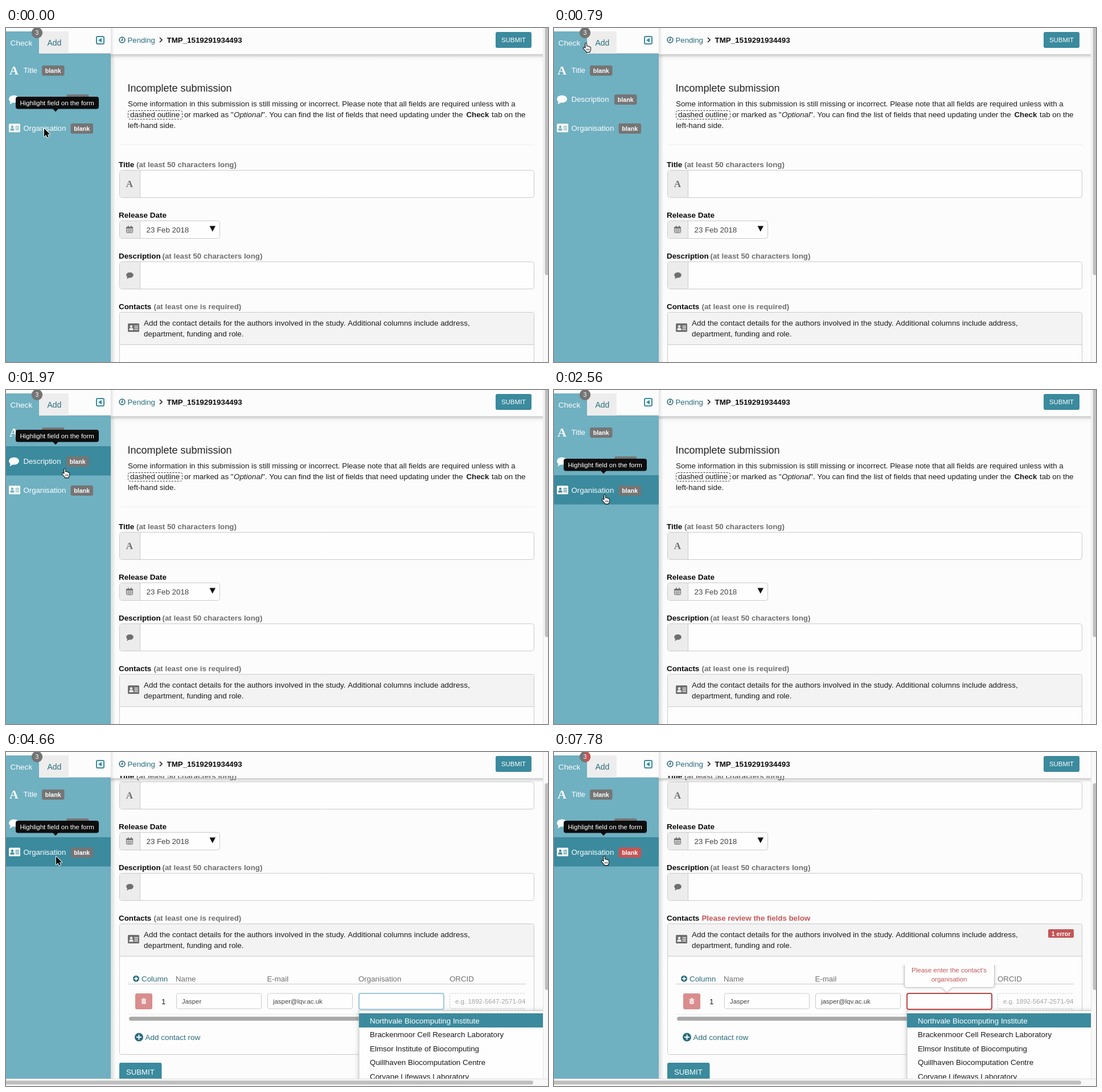
An HTML page with a canvas that plays this animation: 952 by 588 pixels, repeating every 8000 ms.

```html
<!DOCTYPE html>
<html lang="en">
<head>
<meta charset="utf-8">
<title>Submission form</title>
<style>
html, body { margin: 0; width: 100%; height: 100%; overflow: hidden; background: #fcfcfc; }
canvas { display: block; }
</style>
</head>
<body>
<canvas id="stage" width="952" height="588"></canvas>
<script>
const c = document.getElementById('stage').getContext('2d');
const LOOP = 8000, SCROLL = 198, SCROLL_AT = 4660, ERROR_AT = 6300;
const SANS = '"Liberation Sans", Arial, sans-serif';
const SERIF = '"Liberation Serif", serif';
const TEAL = '#3b8a9d', DEEP = '#2a6c7d', SIDE = '#6fb0c1', RED = '#c45556';
const GREY = '#6f6f6f', LINE = '#cacaca', INK = '#1c1c1c';

// start, cursor, x, y, hovered row, tooltip row
const STEPS = [
  [0, 'arrow', 67, 177, -1, 2],
  [500, 'hand', 64, 153, 2, 2],
  [640, 'hand', 61, 114, 1, 1],
  [790, 'hand', 51, 26, -1, -1],
  [930, 'arrow', 59, -13, -1, -1],
  [1080, '', 0, 0, -1, -1],
  [1680, 'arrow', 79, 1, -1, -1],
  [1820, 'hand', 96, 93, 0, 0],
  [1970, 'hand', 98, 138, 1, 1],
  [2110, 'hand', 98, 155, 2, 2],
  [2260, 'hand', 94, 173, 2, 2],
  [2410, 'hand', 90, 180, 2, 2],
  [2560, 'hand', 84, 184, 2, 2],
  [4510, 'arrow', 88, 184, 2, 2],
  [4810, 'hand', 83, 183, 2, 2],
  [6150, 'beam', 88, 184, 2, 2],
  [6300, 'hand', 83, 183, 2, 2]
];
const CARET_ON = [[4810, 5110], [5560, 6150], [6300, 6740], [7340, 7780]];
const FIELD_EDGE = [[4660, '#9cc8d4'], [4810, '#38b2ce'], [6300, '#8c7a84'], [6440, '#bb4543']];
const at = (list, t) => list.filter(s => s[0] <= t).pop();

function text(str, x, y, size = 13.4, color = INK, style = '', align = 'left', family = SANS) {
  c.font = `${style} ${size}px ${family}`;
  c.fillStyle = color;
  c.textAlign = align;
  c.fillText(str, x, y);
}
const bold = (str, x, y, size, color) => text(str, x, y, size, color, 'bold');

function rect(x, y, w, h, color) {
  c.fillStyle = color;
  c.fillRect(x, y, w, h);
}

function box(x, y, w, h, r, fill, edge, width = 1) {
  c.beginPath();
  c.roundRect(x, y, w, h, r);
  if (fill) { c.fillStyle = fill; c.fill(); }
  if (edge) { c.strokeStyle = edge; c.lineWidth = width; c.stroke(); }
}

function shape(points, color) {
  c.beginPath();
  points.forEach(([x, y]) => c.lineTo(x, y));
  c.closePath();
  c.fillStyle = color;
  c.fill();
}

function disc(x, y, r, color, from = 0, to = 2 * Math.PI) {
  c.beginPath();
  c.arc(x, y, r, from, to);
  c.fillStyle = color;
  c.fill();
}

function shade(x, y, w, h, dx, dy, alpha) {
  const g = c.createLinearGradient(x, y, x + dx, y + dy);
  g.addColorStop(0, `rgba(0,0,0,${alpha})`);
  g.addColorStop(1, 'rgba(0,0,0,0)');
  rect(x, y, w, h, g);
}

function shadow(blur, draw) {
  c.save();
  c.shadowColor = 'rgba(0,0,0,.25)';
  c.shadowBlur = blur;
  draw();
  c.restore();
}

function bubble(x, y, rx, ry, color) {
  c.beginPath();
  c.ellipse(x, y, rx, ry, 0, 0, 7);
  c.fillStyle = color;
  c.fill();
  shape([[x - rx * .6, y + ry * .3], [x - rx * .85, y + ry * 1.45], [x, y + ry * .8]], color);
}

function idCard(x, y, color, hole) {
  box(x, y, 20, 15, 1.5, color);
  disc(x + 6, y + 5.5, 2.2, hole);
  box(x + 2.5, y + 8.2, 7, 3.8, [2, 2, 0, 0], hole);
  [4, 7, 10].forEach(dy => rect(x + 11.5, y + dy, 6.5, 1.4, hole));
}

function plus(x, y, r) {
  disc(x, y, r, DEEP);
  const k = r * .6;
  rect(x - k, y - 1, 2 * k, 2, '#fcfcfc');
  rect(x - 1, y - k, 2, 2 * k, '#fcfcfc');
}

function clock(x, y) {
  c.strokeStyle = DEEP;
  c.lineWidth = 1.6;
  c.beginPath();
  c.arc(x, y, 4.9, 0, 7);
  c.moveTo(x + .3, y - 3);
  c.lineTo(x + .3, y + .8);
  c.lineTo(x - 2.2, y + .8);
  c.stroke();
}

function calendar(x, y) {
  box(x + .5, y + 2.5, 11, 10, 1, null, GREY);
  rect(x, y + 2, 12, 3, GREY);
  [3, 8].forEach(dx => rect(x + dx, y, 1.6, 3.5, GREY));
  c.beginPath();
  [3.5, 6, 8.5].forEach(dx => { c.moveTo(x + dx, y + 5); c.lineTo(x + dx, y + 12); });
  [7.5, 10].forEach(dy => { c.moveTo(x, y + dy); c.lineTo(x + 12, y + dy); });
  c.lineWidth = .7;
  c.stroke();
}

function trash(x, y) {
  rect(x, y + 1.5, 9, 1.3, '#fff');
  rect(x + 3, y, 3, 1.5, '#fff');
  box(x + 1, y + 3.4, 7, 6.6, 1, '#fff');
  [2.6, 4.2, 5.8].forEach(dx => rect(x + dx, y + 4.6, .7, 4, '#d98d8d'));
}

function field(x, y, w, h) {
  box(x + .5, y + .5, w - 1, h - 1, 4, '#fefefe', LINE);
  box(x + 1, y + 1, 36, h - 2, [3, 0, 0, 3], '#ececec');
  rect(x + 36, y, 1, h, LINE);
}

function label(name, hint, x, y, color = GREY) {
  bold(name, 198, y, 13.4, '#0a0a0a');
  bold(hint, x, y, 13.3, color);
}

function intro() {
  text('Incomplete submission', 213.5, 112, 18, '#222');
  text('Some information in this submission is still missing or incorrect. Please note that all fields are required unless with a', 214, 138, 13.33);
  c.setLineDash([3, 2]);
  box(214.5, 145.5, 95, 15, 3, null, '#333');
  c.setLineDash([]);
  text('dashed outline', 218, 157);
  text('or marked as "', 313, 157);
  text('Optional', 400, 157, 13.4, INK, 'italic');
  text('". You can find the list of fields that need updating under the', 450, 157);
  bold('Check', 808.5, 157, 13.3);
  text('tab on the', 853, 157);
  text('left-hand side.', 214, 176);
  rect(199, 205, 729, 1, '#eeeeee');
}

function contacts(failed) {
  if (failed) label('Contacts', 'Please review the fields below', 259.5, 495, RED);
  else label('Contacts', '(at least one is required)', 259.5, 495);
  box(199.5, 500.5, 728, 230, 3, '#fdfdfd', LINE);
  box(200, 501, 727, 56, [3, 3, 0, 0], '#f3f3f3');
  rect(199, 557, 729, 1, LINE);
  idCard(214, 520, GREY, '#f3f3f3');
  text('Add the contact details for the authors involved in the study. Additional columns include address,', 242, 524, 13.44);
  text('department, funding and role.', 242, 543, 13.44);
  if (failed) {
    box(868, 510, 45, 15, 2, RED);
    text('1 error', 890.5, 521.5, 10.6, '#fff', 'bold', 'center');
  }
}

function table(t, failed) {
  plus(228.5, 399, 5.5);
  text('Column', 238, 404, 13.4, DEEP);
  [['Name', 298], ['E-mail', 458.5], ['Organisation', 619], ['ORCID', 779]]
    .forEach(([s, x]) => text(s, x, 404, 13.3, GREY));
  rect(214, 408, 699, 1, LINE);
  rect(214, 461, 699, 1, '#eeeeee');
  box(227, 425, 30, 28, 3, '#d98d8d');
  trash(237.5, 433.5);
  text('1', 273, 443.5);
  box(299.5, 425, 149, 27, 3, '#fefefe', LINE);
  text('Jasper', 309, 442.5, 11.4, '#444');
  box(459.5, 425, 149, 27, 3, '#fefefe', LINE);
  text('jasper@lqv.ac.uk', 469, 442.5, 11.4, '#444');

  c.save();
  c.beginPath();
  c.rect(770, 420, 143, 40);
  c.clip();
  c.setLineDash([3, 2]);
  box(779.5, 425, 150, 27, 3, '#fefefe', LINE);
  c.restore();
  text('e.g. 1892-5647-2571-94', 789, 442.5, 11.5, '#a3a3a3');

  box(216, 466, 600, 7, 3.5, '#a9a9a9');
  plus(233.5, 502, 7.5);
  text('Add contact row', 244.5, 507, 13.5, DEEP);
  box(199, 547, 74.5, 33, 3, TEAL);
  text('SUBMIT', 211, 568, 13.2, '#fff');
  dropdown();
  box(620, 425, 149, 28, 3, '#fefefe', at(FIELD_EDGE, t)[1], 2);
  if (CARET_ON.some(([a, b]) => t >= a && t < b)) rect(630, 430, 1, 17, '#222');
  if (failed) popover();
}

function popover() {
  c.save();
  c.beginPath();
  c.rect(600, 375, 190, 60);
  c.clip();
  const outline = new Path2D('M615.5 365V410Q615.5 414.5 620 414.5H681L690 423.5L699 414.5H769Q773.5 414.5 773.5 410V365Z');
  c.fillStyle = '#fefefe';
  shadow(5, () => c.fill(outline));
  c.strokeStyle = '#c4c4c4';
  c.lineWidth = 1;
  c.stroke(outline);
  c.restore();
  text("Please enter the contact's", 694, 388, 11.5, RED, '', 'center');
  text('organisation', 694, 404, 11.5, RED, '', 'center');
}

function dropdown() {
  shadow(8, () => rect(620, 456, 340, 140, '#fefefe'));
  rect(619.5, 455, 1, 121, LINE);
  rect(620, 455, 323, 1, LINE);
  rect(620, 460, 323, 25, TEAL);
  ['Northvale Biocomputing Institute', 'Brackenmoor Cell Research Laboratory',
   'Elmsor Institute of Biocomputing', 'Quillhaven Biocomputation Centre',
   'Corvane Lifeways Laboratory'
  ].forEach((s, i) => text(s, 639, 477.6 + i * 24.6, 13.4, i ? INK : '#fff'));
}

function form(t, failed) {
  const scrolled = t >= SCROLL_AT;
  rect(184, 0, 768, 588, '#f9f9f9');
  c.save();
  c.translate(0, scrolled ? -SCROLL : 0);
  rect(192, 57, 751, 760, '#fcfcfc');
  intro();
  label('Title', '(at least 50 characters long)', 229, 245);
  field(199, 250, 729, 49);
  text('A', 217, 280, 17, GREY, 'bold', 'center', SERIF);
  bold('Release Date', 198, 334, 13.5, '#0a0a0a');
  field(199, 339, 177, 32);
  calendar(211, 348);
  text('23 Feb 2018', 246.5, 359.5, 13.3, '#444');
  shape([[357.5, 348.5], [368, 348.5], [362.7, 358.5]], '#111');
  label('Description', '(at least 50 characters long)', 274.5, 406);
  field(199, 411, 729, 49);
  bubble(217.5, 435, 6.3, 4.8, GREY);
  contacts(failed);
  c.restore();
  if (scrolled) table(t, failed);
  shade(184, 46, 8, 542, 8, 0, .12);
}

function header(scrolled) {
  shade(184, 46, 759, 7, 0, 7, .2);
  // the lower edge of the bar lets scrolled labels show through
  rect(184, 0, 759, scrolled ? 42 : 46, '#fcfcfc');
  rect(184, 46, 759, 1, '#d2d2d2');
  shade(184, 0, 6, 46, 6, 0, .1);
  clock(204, 21);
  text('Pending', 213.5, 25.5, 13.2, DEEP);
  c.beginPath();
  c.moveTo(270, 17);
  c.lineTo(274, 21);
  c.lineTo(270, 25);
  c.strokeStyle = '#222';
  c.lineWidth = 1.7;
  c.stroke();
  bold('TMP_1519291934493', 282.5, 25.5, 13.35, '#0a0a0a');
  box(860, 7, 63, 28, 3, TEAL);
  text('SUBMIT', 891.5, 24.7, 11.4, '#fff', '', 'center');
}

function scrollbars(scrolled) {
  rect(943, 0, 9, 588, '#f8f8f8');
  rect(943, 0, 1, 588, '#e4e4e4');
  box(946.5, scrolled ? 55 : -6, 8, scrolled ? 364 : 441, 3.5, '#bfbfbf');
  if (!scrolled) return;
  rect(0, 575, 952, 13, '#f8f8f8');
  rect(0, 575, 952, 1, '#dedede');
  box(-6, 578.5, 932, 7, 3.5, '#bfbfbf');
}

function sidebar(hover, failed) {
  rect(0, 0, 184, 45, '#fcfcfc');
  rect(110, 44, 74, 1, '#d8d8d8');
  rect(0, 45, 184, 543, SIDE);
  rect(0, 6, 58, 40, SIDE);
  rect(58, 6, 52, 39, '#ededed');
  text('Check', 7.5, 30.5, 13.7, '#fff');
  text('Add', 72.5, 30.5, 14, DEEP, '500');
  disc(54.5, 8.5, 9.7, '#747474');
  if (failed) disc(54.5, 8.5, 9.7, RED, -Math.PI / 2, Math.PI / 2);
  text('3', 54.5, 12.3, 10.5, '#fff', '', 'center');
  box(159, 15, 13, 13, 2, null, TEAL, 2);
  shape([[168, 17.5], [168, 25.5], [162, 21.5]], TEAL);

  if (hover >= 0) rect(0, 48 + hover * 51, 184, hover ? 51.5 : 51, TEAL);
  const hole = hover === 2 ? TEAL : SIDE;
  text('A', 14, 82, 22, '#fff', 'bold', 'center', SERIF);
  bubble(14, 125, 9, 6.6, '#fff');
  idCard(5, 168.5, '#fff', hole);
  [['Title', 63], ['Description', 106], ['Organisation', 113.5]].forEach(([name, x], i) => {
    const y = 74 + i * 51;
    text(name, 30.5, y + 5, 13.2, '#fff');
    box(x, y - 8, 39.5, 18, 3, failed && i === 2 ? RED : '#757575');
    text('blank', x + 19.7, y + 4.5, 10.7, '#fff', 'bold', 'center');
  });
}

function tooltip(row) {
  if (row < 0) return;
  const y = 19 + row * 51;
  box(17, y, 146, 21.5, 4, '#0d0d0e');
  shape([[82, y + 21], [92, y + 21], [87, y + 26.5]], '#0d0d0e');
  text('Highlight field on the form', 24.5, y + 14.5, 11.5, '#fff');
}

const CURSORS = {
  arrow: ['M0 0V14.2L3.3 11.1L5.4 15.6L7.8 14.6L5.8 10.2H10.2Z', '#000', '#fff'],
  hand: ['M4 1.6Q4 .3 5.2 .3Q6.5 .3 6.5 1.6V6Q8.6 5 9.1 6.6Q11 5.8 11.4 7.4Q13.5 7 13.5 9V12Q13.5 14 12 15V16.6H5.5V15.3L1 10.5Q-.2 8.6 1.2 8Q2.6 7.7 4 9.5Z', '#fff', '#000'],
  beam: ['M-3 -7.5Q0 -7.5 0 -5Q0 -7.5 3 -7.5M0 -5V6Q0 8.5 -3 8.5M0 6Q0 8.5 3 8.5M-2 3H2', '', '#000']
};

function cursor(kind, x, y) {
  if (!kind) return;
  const [d, fill, edge] = CURSORS[kind];
  const path = new Path2D(d);
  c.save();
  c.translate(x, y);
  c.lineJoin = 'round';
  c.strokeStyle = edge;
  c.lineWidth = kind === 'arrow' ? 1.8 : 1.1;
  c.stroke(path);
  if (fill) { c.fillStyle = fill; c.fill(path); }
  if (kind === 'hand') {
    c.lineWidth = .8;
    c.stroke(path);
    c.stroke(new Path2D('M6.7 10.5V13.5M8.8 10.5V13.5M10.9 10.5V13.5'));
  }
  c.restore();
}

function draw(now) {
  const t = now % LOOP;
  const failed = t >= ERROR_AT, scrolled = t >= SCROLL_AT;
  const [, kind, x, y, hover, tip] = at(STEPS, t);
  form(t, failed);
  header(scrolled);
  sidebar(hover, failed);
  tooltip(tip);
  scrollbars(scrolled);
  cursor(kind, x, y);
  requestAnimationFrame(draw);
}
requestAnimationFrame(draw);
</script>
</body>
</html>
```
